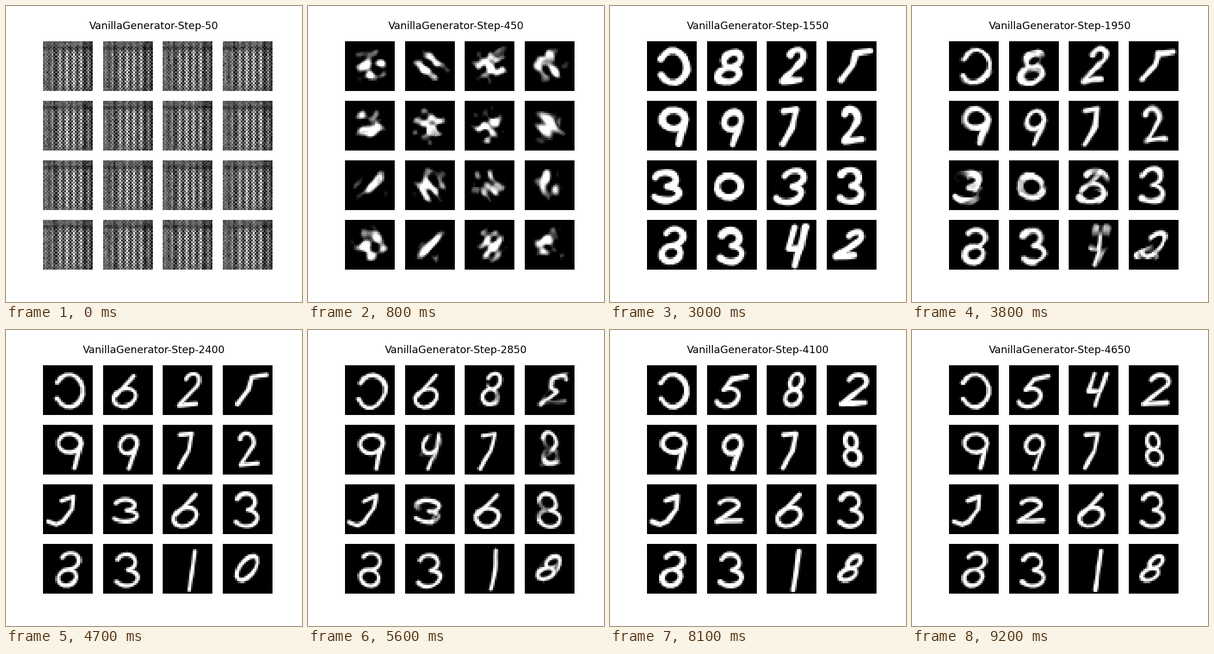
Write a matplotlib script that moves like this. It is 512x512 px and loops after 9300 ms.

```python
import numpy as np
import matplotlib.pyplot as plt
from matplotlib.animation import FuncAnimation

N = 28                      # samples per side of a tile
SIDE = 85.7                 # tile side in stage pixels
FRAMES, INTERVAL = 93, 100

axis = np.arange(N)
COL, ROW = np.meshgrid(axis, axis)
X, Y = (COL + 0.5) * SIDE / N, (ROW + 0.5) * SIDE / N


def line(*flat):
    return np.reshape(flat, (-1, 2))


def arc(x, y, rx, ry, start, stop):
    """Elliptic arc in degrees, clockwise from the right."""
    a = np.radians(np.linspace(start, stop, 14))
    return np.column_stack([x + rx * np.cos(a), y + ry * np.sin(a)])


# Pen paths in a box from -1 to 1, y pointing down.
GLYPHS = {
    "0": [arc(0, 0, 1, 1, 0, 360)],
    "1": [line(0, -1, 0, 1)],
    "2": [arc(0, -0.5, 0.8, 0.5, -160, 50), line(-1, 1, 1, 0.9)],
    "3": [arc(0, -0.5, 0.8, 0.5, -160, 80), arc(0, 0.5, 1, 0.5, -80, 150)],
    "4": [line(-0.6, -1, -0.9, 0.1, 0.5, 0.1, 0.8, -1, 0.2, 1)],
    "5": [line(1, -1, -0.1, -0.8, -0.6, -0.1), arc(-0.1, 0.4, 0.9, 0.6, -100, 150)],
    "6": [line(0.3, -1), arc(0, 0.4, 0.9, 0.6, 180, 540)],
    "7": [line(-0.5, -0.95, 0.9, -1, 0.5, 0, -0.6, 1)],
    "8": [arc(0, -0.5, 0.7, 0.5, 90, 450), arc(0, 0.5, 0.9, 0.5, -90, 270)],
    "9": [arc(0, -0.45, 0.95, 0.55, 0, 360), line(0.4, 1)],
    "c": [arc(0, 0, 1, 1, -150, 150)],
    "e": [arc(0.3, -0.5, 0.7, 0.5, -20, -260), line(0.3, 0.1, -0.9, 0.9, 1, 0.8)],
    "g": [arc(0, -0.5, 0.9, 0.5, -150, 80), arc(0, 0.5, 0.9, 0.5, -90, 270)],
    "j": [line(0, -0.7, 0.9, -1, 0.8, -0.1, 0.1, 0.8, -0.4, 1, -1, 0.8)],
    "r": [line(1, -1, -0.2, -0.85, -0.3, 0, -1, 1)],
}

# Centre x, centre y, half width, half height and slant of each tile's writing.
BOXES = [
    (45, 44, 24, 28, 0), (40, 45, 21, 26, 0.25), (48, 42, 15, 27, 0.2), (50, 42, 20, 25, 0.2),
    (46, 45, 21, 29, 0), (42, 47, 16, 28, 0.15), (37, 45, 15, 29, 0), (43, 42, 15, 27, -0.1),
    (32, 45, 23, 24, 0), (38, 45, 21, 19, 0), (42, 45, 22, 27, 0.3), (40, 44, 20, 28, 0),
    (44, 44, 18, 28, 0.15), (40, 45, 20, 27, 0), (51, 46, 14, 33, 0.15), (42, 42, 15, 21, 0.5),
]

# Training step: what each tile, row by row, has learnt to write, and the pen width.
LESSONS = {
    1000: ("c6j2 4819 j80j 3912", 12),
    1550: ("c82r 9972 3033 g342", 11),
    2400: ("c62r 9972 j363 g310", 7),
    3250: ("c68e 9478 j968 g318", 7),
    4100: ("c582 9978 j263 g318", 8),
    4650: ("c542 9978 j263 g318", 7),
}
WEAVE, BLOBS = 50, 350
KEYS = [WEAVE, BLOBS, *LESSONS]


def waves(seed, reach=0.9):
    """Smooth random field in 0..1."""
    rng = np.random.default_rng(seed)
    kx, ky = rng.uniform(-reach, reach, (2, 8, 1, 1))
    field = np.cos(kx * COL + ky * ROW + rng.uniform(0, 2 * np.pi, (8, 1, 1))).sum(0)
    return (field - field.min()) / np.ptp(field)


def weave(tile):
    """Checkered texture of the untrained network."""
    rng = np.random.default_rng(tile)
    rise = np.interp(ROW, [0, 3, 7, 23, 27], [0.2, 0.3, 1, 1, 0.5])
    spread = np.interp(COL, [0, 4, 8, 13, 18, 27], [0.25, 0.4, 0.8, 1.1, 1.0, 0.6])
    stripes = 0.26 * np.cos(np.pi / 2 * (COL - 1))
    checks = 0.22 * (-1.0) ** (ROW + COL)
    shade = 0.36 - 0.15 * (COL == 6) - 0.12 * (COL > 21) - 0.1 * (abs(ROW - 3.5) < 1)
    grain = rng.normal(0, 0.05, (N, N))
    return np.clip(shade + rise * spread * (stripes + checks + 0.1) + grain, 0, 1)


def blobs(tile):
    centre = np.exp(-((COL - 13.5) ** 2 + (ROW - 13.5) ** 2) / 110)
    return np.clip(4 * (waves(tile + 50) * centre - 0.3) + 0.12 * weave(tile), 0, 1)


def writing(step, tile, x, y):
    letters, width = LESSONS[step]
    cx, cy, half_w, half_h, slant = BOXES[tile]
    u, v = np.vstack(GLYPHS[letters.replace(" ", "")[tile]]).T[:, :, None, None]
    px, py = cx + half_w * u - slant * half_h * v, cy + half_h * v
    x0, y0 = px[:-1], py[:-1]
    dx, dy = np.diff(px, axis=0), np.diff(py, axis=0)
    t = np.clip(((x - x0) * dx + (y - y0) * dy) / (dx * dx + dy * dy + 1e-9), 0, 1)
    dist = np.hypot(x - x0 - t * dx, y - y0 - t * dy).min(0)
    # uneven pen pressure
    pressure = width * (0.75 + 0.5 * waves(step + tile, 0.6))
    ink = np.clip((pressure / 2 - dist) / 3.2 + 0.5, 0, 1)
    if step == 1000:        # still broken into pieces
        ink = ink * np.clip(6 * waves(tile + 200, 0.7) - 2, 0, 1)
    return ink


def layer(step, tile, x, y):
    if step == WEAVE:
        return weave(tile)
    if step == BLOBS:
        return blobs(tile)
    return writing(step, tile, x, y)


def render(step, tile):
    k = min(np.searchsorted(KEYS, step, side="right"), len(KEYS) - 1)
    start, end = KEYS[k - 1], KEYS[k]
    t = (step - start) / (end - start)
    # each region switches to the next shape at its own moment
    mix = np.clip((1.5 * t - waves(100 * k + tile, 0.5)) / 0.5, 0, 1)
    a, b = np.random.default_rng(step * 16 + tile).uniform(0, 2 * np.pi, 2)
    sway = 1.8 * np.sin(np.pi * t)
    x, y = X + sway * np.sin(Y / 14 + a), Y + sway * np.sin(X / 14 + b)
    return (1 - mix) * layer(start, tile, x, y) + mix * layer(end, tile, x, y)


fig, axes = plt.subplots(4, 4, figsize=(5.12, 5.12), dpi=100)
title = fig.suptitle("", y=0.95, fontsize=12.8, fontfamily="DejaVu Sans")
images = []
for ax in axes.flat:
    ax.axis("off")
    images.append(ax.imshow(np.zeros((N, N)), cmap="gray", vmin=0, vmax=1))


def update(i):
    step = 50 * (i + 1)
    title.set_text(f"VanillaGenerator-Step-{step}")
    for tile, image in enumerate(images):
        image.set_data(render(step, tile))
    return [title, *images]


anim = FuncAnimation(fig, update, frames=FRAMES, interval=INTERVAL, repeat=True)
plt.show()
```
